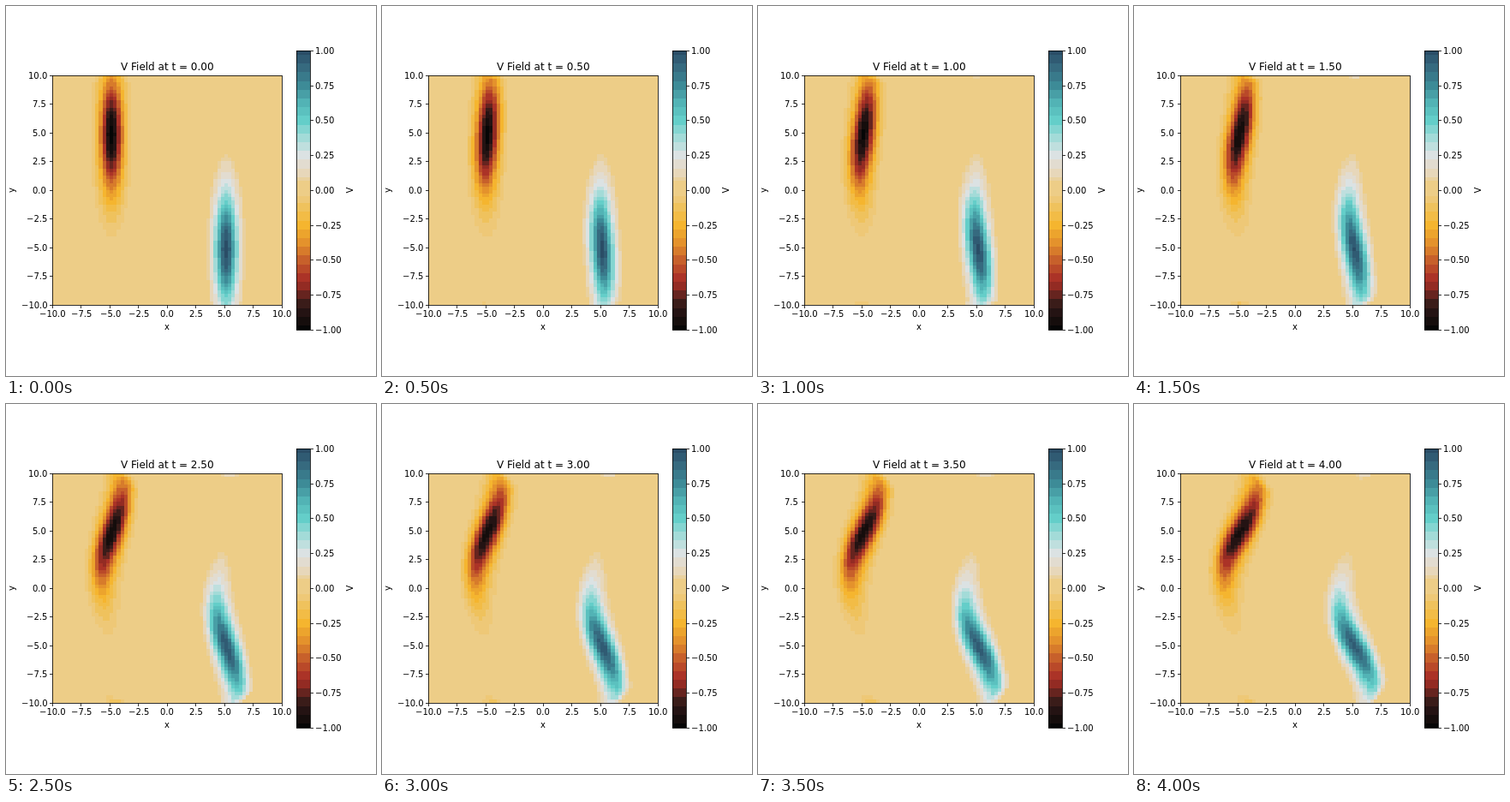
Recreate the animation shown at these times as an HTML page with a canvas. Size 432x432 px, loop 4500 ms.

```html
<!DOCTYPE html>
<html lang="en">
<head>
<meta charset="utf-8">
<title>V Field</title>
<style>
html, body { margin: 0; width: 100%; height: 100%; overflow: hidden; background: #fff; }
canvas { display: block; width: 432px; height: 432px; }
</style>
</head>
<body>
<canvas id="stage" width="432" height="432"></canvas>
<script>
const N = 64, SIZE = N * N, SPAN = 20, VISCOSITY = 0.01;
const FRAMES = 9, FRAME_MS = 500, FRAME_T = 0.5, SUBSTEPS = 4;

// ---- Fourier transform on the periodic grid ----
const cosT = [], sinT = [], flip = [];
for (let i = 0; i < N; i++) {
  cosT.push(Math.cos(2 * Math.PI * i / N));
  sinT.push(Math.sin(2 * Math.PI * i / N));
  let r = 0;
  for (let b = 1, m = N / 2; b < N; b *= 2, m /= 2) if (i & b) r += m;
  flip.push(r);
}

function swap(a, i, j) {
  const t = a[i];
  a[i] = a[j];
  a[j] = t;
}

function fftLine(re, im, start, step, sign) {
  for (let i = 0; i < N; i++) {
    if (flip[i] > i) {
      swap(re, start + i * step, start + flip[i] * step);
      swap(im, start + i * step, start + flip[i] * step);
    }
  }
  for (let half = 1; half < N; half *= 2) {
    const turn = N / (2 * half);
    for (let base = 0; base < N; base += 2 * half) {
      for (let k = 0; k < half; k++) {
        const c = cosT[k * turn], s = sign * sinT[k * turn];
        const p = start + (base + k) * step, q = p + half * step;
        const a = re[q] * c - im[q] * s, b = re[q] * s + im[q] * c;
        re[q] = re[p] - a;
        im[q] = im[p] - b;
        re[p] += a;
        im[p] += b;
      }
    }
  }
}

function fft(f, sign) {
  for (let i = 0; i < N; i++) fftLine(f.re, f.im, i * N, 1, sign);
  for (let i = 0; i < N; i++) fftLine(f.re, f.im, i, N, sign);
  if (sign > 0) {
    for (let i = 0; i < SIZE; i++) {
      f.re[i] /= SIZE;
      f.im[i] /= SIZE;
    }
  }
  return f;
}

const blank = () => ({ re: new Float64Array(SIZE), im: new Float64Array(SIZE) });
const copy = f => ({ re: f.re.slice(), im: f.im.slice() });

function addScaled(f, g, s) {
  const out = copy(f);
  for (let i = 0; i < SIZE; i++) {
    out.re[i] += s * g.re[i];
    out.im[i] += s * g.im[i];
  }
  return out;
}

// ---- Vorticity carried by its own flow, with slight diffusion ----
const mode = i => i < N / 2 ? i : i - N;
const wave = i => 2 * Math.PI / SPAN * mode(i);
const slope = i => i === N / 2 ? 0 : wave(i);
const kept = i => Math.abs(mode(i)) < N / 3;

function rate(w) {
  const flow = blank(), grad = blank(), out = blank();
  for (let j = 0; j < N; j++) {
    for (let i = 0; i < N; i++) {
      const n = j * N + i, kx = slope(i), ky = slope(j);
      const k2 = kx * kx + ky * ky || 1;
      const a = w.re[n], b = w.im[n];
      flow.re[n] = (kx * a - ky * b) / k2;
      flow.im[n] = (kx * b + ky * a) / k2;
      grad.re[n] = -ky * a - kx * b;
      grad.im[n] = kx * a - ky * b;
    }
  }
  fft(flow, 1);
  fft(grad, 1);
  for (let n = 0; n < SIZE; n++) {
    out.re[n] = -(flow.re[n] * grad.re[n] + flow.im[n] * grad.im[n]);
  }
  fft(out, -1);
  for (let j = 0; j < N; j++) {
    for (let i = 0; i < N; i++) {
      const n = j * N + i;
      const damp = VISCOSITY * (wave(i) ** 2 + wave(j) ** 2);
      if (!kept(i) || !kept(j)) out.re[n] = out.im[n] = 0;
      out.re[n] -= damp * w.re[n];
      out.im[n] -= damp * w.im[n];
    }
  }
  return out;
}

function advance(w, dt) {
  const a = rate(w);
  const b = rate(addScaled(w, a, dt / 2));
  const c = rate(addScaled(w, b, dt / 2));
  const d = rate(addScaled(w, c, dt));
  let next = addScaled(w, a, dt / 6);
  next = addScaled(next, b, dt / 3);
  next = addScaled(next, c, dt / 3);
  return addScaled(next, d, dt / 6);
}

const blob = (dx, dy) => Math.exp(-dx * dx - dy * dy / 25);

// Rows run from the bottom up; the top row lies at y = 10.
function solve() {
  let w = blank();
  for (let j = 0; j < N; j++) {
    for (let i = 0; i < N; i++) {
      const x = i * SPAN / N - 10, y = (j + 1) * SPAN / N - 10;
      w.re[j * N + i] = blob(x - 5, y + 5) - blob(x + 5, y - 5);
    }
  }
  const fields = [w.re.slice()];
  fft(w, -1);
  while (fields.length < FRAMES) {
    for (let s = 0; s < SUBSTEPS; s++) w = advance(w, FRAME_T / SUBSTEPS);
    fields.push(fft(copy(w), 1).re);
  }
  return fields;
}

// ---- Colours ----
const stops = [
  [-1, "060606"], [-0.87, "251413"], [-0.78, "46201d"], [-0.72, "862721"],
  [-0.62, "ad3427"], [-0.5, "c7602b"], [-0.4, "e08b2b"], [-0.25, "f5b52f"],
  [-0.12, "efc35f"], [-0.06, "eec878"], [0, "edcd87"], [0.07, "e9d1a2"],
  [0.15, "e6d9c5"], [0.25, "dbe2e3"], [0.37, "a6dcd9"], [0.5, "64cec9"],
  [0.62, "53b5b6"], [0.75, "3d8b97"], [0.87, "366b80"], [1, "2a4d66"]
].map(([v, hex]) => [v, [0, 2, 4].map(i => parseInt(hex.substr(i, 2), 16))]);

function colour(value) {
  const flat = value > -0.04 && value < 0.065;
  const v = flat ? 0 : Math.max(-1, Math.min(1, Math.round(value * 16) / 16));
  let s = 1;
  while (s < stops.length - 1 && stops[s][0] < v) s++;
  const [v0, c0] = stops[s - 1], [v1, c1] = stops[s];
  const mix = c0.map((c, i) => Math.round(c + (c1[i] - c) * (v - v0) / (v1 - v0)));
  return `rgb(${mix})`;
}

// ---- Drawing ----
const ctx = document.getElementById("stage").getContext("2d");
const LEFT = 54, RIGHT = 322, TOP = 81, BOTTOM = 349;
const FLOOR = 348.84, EXTENT = 267.84, MIDDLE = LEFT + EXTENT / 2;
const BAR = { x: 339, y: 52, w: 16, h: 326, top: 51.84 };

function line(x0, y0, x1, y1) {
  ctx.beginPath();
  ctx.moveTo(x0, y0);
  ctx.lineTo(x1, y1);
  ctx.stroke();
}

function setFont(size, align) {
  ctx.font = `${size}px "DejaVu Sans", sans-serif`;
  ctx.textAlign = align;
  ctx.fillStyle = "#000";
}

// Aligns by inked width (anchor 0 left, 1 right) and snaps to whole pixels.
function label(text, x, y, anchor = 0.5, size = 10) {
  setFont(size, "left");
  const box = ctx.measureText(text);
  const bearing = -box.actualBoundingBoxLeft;
  const ink = box.actualBoundingBoxRight - bearing;
  const start = Math.round(x - ink * anchor + bearing) - Math.floor(bearing);
  ctx.fillText(text, start, y);
}

function upright(text, x, y) {
  ctx.save();
  ctx.translate(x, y);
  ctx.rotate(-Math.PI / 2);
  setFont(10, "center");
  ctx.fillText(text, 0, 0);
  ctx.restore();
}

const number = (v, digits) => v.toFixed(digits).replace("-", "\u2212");

function drawField(field) {
  const edgeX = i => Math.round(LEFT + i * EXTENT / N);
  const edgeY = j => Math.round(FLOOR - j * EXTENT / N);
  for (let j = 0; j < N; j++) {
    for (let i = 0; i < N; i++) {
      const x = edgeX(i), y = edgeY(j + 1);
      ctx.fillStyle = colour(field[j * N + i]);
      ctx.fillRect(x, y, edgeX(i + 1) - x, edgeY(j) - y);
    }
  }
}

function drawAxes() {
  for (let i = 0; i <= 8; i++) {
    const text = number(-10 + 2.5 * i, 1), shift = EXTENT * i / 8;
    const x = Math.round(LEFT + shift), y = Math.round(FLOOR - shift);
    line(x + 0.5, BOTTOM + 0.5, x + 0.5, BOTTOM + 4);
    label(text, LEFT + shift, 363);
    line(LEFT + 0.5, y + 0.5, LEFT - 3, y + 0.5);
    label(text, 47, y + 4, 1);
  }
  ctx.strokeRect(LEFT + 0.5, TOP + 0.5, RIGHT - LEFT, BOTTOM - TOP);
  label("x", MIDDLE, 378);
  upright("y", 10, 215);
}

function drawBar() {
  for (let y = 0; y < BAR.h; y++) {
    ctx.fillStyle = colour(1 - 2 * (y + 0.5) / BAR.h);
    ctx.fillRect(BAR.x, BAR.y + y, BAR.w, 1);
  }
  ctx.strokeRect(BAR.x + 0.5, BAR.y + 0.5, BAR.w, BAR.h);
  for (let i = 0; i <= 8; i++) {
    const y = Math.round(BAR.top + BAR.h * i / 8);
    line(BAR.x + BAR.w + 0.5, y + 0.5, BAR.x + BAR.w + 4, y + 0.5);
    label(number(1 - i / 4, 2), 361.3, y + 4, 0);
  }
  upright("V", 405, 215);
}

function draw(index) {
  ctx.fillStyle = "#fff";
  ctx.fillRect(0, 0, 432, 432);
  ctx.strokeStyle = "#000";
  ctx.lineWidth = 0.8;
  drawField(fields[index]);
  drawAxes();
  drawBar();
  label(`V Field at t = ${(index * FRAME_T).toFixed(2)}`, MIDDLE, 75, 0.5, 12);
}

const fields = solve();
let shown = -1;

function tick() {
  const index = Math.floor(performance.now() / FRAME_MS) % FRAMES;
  if (index !== shown) draw(shown = index);
  requestAnimationFrame(tick);
}
tick();
</script>
</body>
</html>
```
